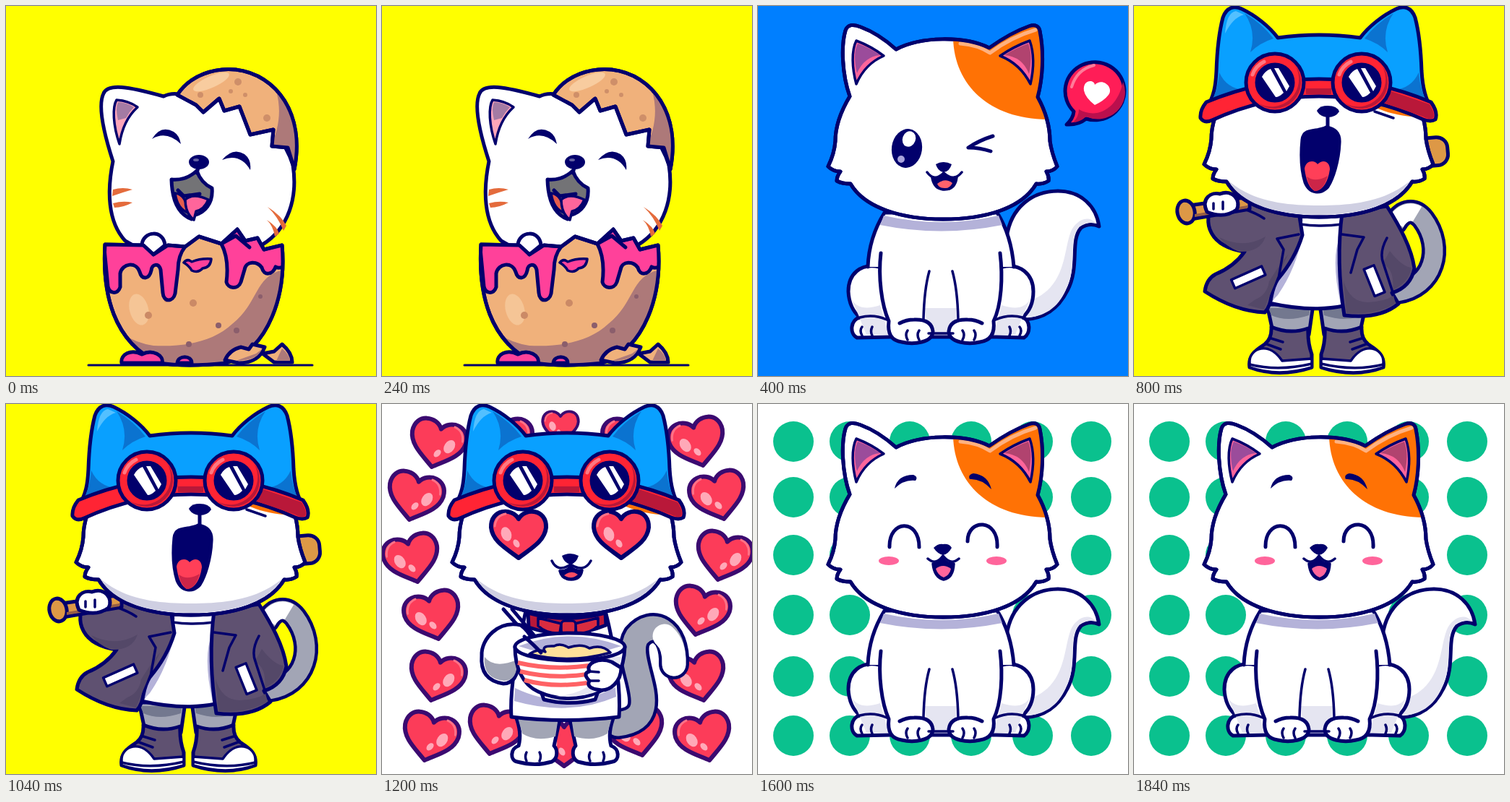
Recreate the animation shown at these times as an HTML page. Size 512x512 px, loop 2000 ms.

```html
<!DOCTYPE html>
<html lang="en">
<head>
<meta charset="utf-8">
<title>Cat stickers</title>
<style>
html, body { margin: 0; width: 100%; height: 100%; overflow: hidden; }
svg { display: block; width: 100vw; height: 100vh; }
.scene { display: none; }
.scene.on { display: inline; }
.ink { stroke: #02006c; stroke-width: 5; stroke-linejoin: round; stroke-linecap: round; }
.flat { stroke: none; }
.thin { stroke-width: 3.5; }
.line { fill: none; }
.white { fill: #fff; }
.navy { fill: #02006c; }
.lilac { fill: #b4b2d9; }
.pale { fill: #e5e5f1; }
.grey { fill: #a2a5b5; }
.pink { fill: #ff659b; }
.orange { fill: #ff7205; }
.shell { fill: #f0b17b; }
.shade { fill: #ad7979; }
.goo { fill: #ff419a; }
.jacket { fill: #5f5171; }
.dark { fill: #544868; }
.wood { fill: #dd9846; }
.red { fill: #ff2434; }
.crimson { fill: #b91839; }
</style>
</head>
<body>
<svg viewBox="0 0 512 512">
<defs>
  <path id="headShape" d="M127 125C116 94 115 54 121 34C124 25 132 25 142 29C161 36 180 50 191 60C225 42 285 41 320 58C337 46 355 35 375 28C384 25 389 28 390 35C396 65 394 100 387 126C398 146 404 166 404 187C406 202 410 212 414 222C410 227 405 229 399 229Q403 236 402 242Q394 247 385 246C365 280 315 295 256 295C200 295 148 280 128 246Q116 246 109 242Q109 236 114 229Q104 229 97 222C102 212 106 200 107 187C107 165 115 145 127 125Z"/>
  <clipPath id="headClip"><use href="#headShape"/></clipPath>
  <path id="egg" d="M137 330L190 331L204 344L224 331L248 333L267 319L298 329L320 309L331 325L348 321L357 337L382 331C388 398 365 473 305 494Q250 500 212 494C148 465 133 397 137 330Z"/>
  <clipPath id="eggClip"><use href="#egg"/></clipPath>
  <path id="shellTop" d="M237 123C255 95 290 85 318 88C375 95 414 150 399 226L390 196L368 194L370 171L338 178L323 139L302 145L295 128L273 147L263 137Z"/>
  <clipPath id="shellClip"><use href="#shellTop"/></clipPath>

  <g id="head">
    <use href="#headShape" class="white"/>
    <g clip-path="url(#headClip)" class="flat">
      <path class="orange" d="M270 45C272 110 320 156 400 157L400 20H270Z"/>
      <path class="line" stroke="#ffb180" stroke-width="5" d="M280 52Q305 54 321 65Q350 43 384 33"/>
    </g>
    <use href="#headShape" class="line"/>
    <g class="thin">
      <path class="pink" d="M136 108C130 86 129 62 136 48Q157 56 174 69Q148 80 136 108Z"/>
      <path class="flat" fill="#9b4c9b" d="M137 93C133 75 133 62 138 52Q155 58 169 68Q147 70 137 93Z"/>
      <path class="pink" d="M377 108C382 86 382 65 376 48Q354 56 335 69Q363 80 377 108Z"/>
      <path class="flat" fill="#b1436f" d="M375 94C379 75 378 62 374 52Q357 58 341 68Q366 70 375 94Z"/>
    </g>
  </g>

  <g id="sitBody">
    <path class="white" d="M344 320C350 278 380 256 415 256C447 256 468 277 472 305Q459 299 447 307C431 325 446 360 428 394C415 420 395 433 368 434Z"/>
    <path class="flat pale" d="M468 301C455 286 438 300 433 312C424 335 426 370 400 394Q385 407 372 407L370 431C395 431 415 418 426 393C443 360 428 325 444 306Q457 297 468 301Z"/>
    <path class="white" d="M168 361C142 355 125 371 125 395Q126 418 141 431C128 434 126 453 137 459L184 458L330 458L368 459C378 453 377 434 366 431Q381 418 381 395C381 371 362 355 338 361"/>
    <path class="white" d="M152 361C153 335 160 310 175 286H331C346 310 352 335 354 361"/>
    <path class="flat white" d="M170 340H336V440H170Z"/>
    <path class="flat pale" d="M129 405Q139 424 169 414L181 455H150L140 430ZM377 405Q367 424 337 414L326 455H356L366 430Z"/>
    <path class="flat pale" d="M230 418H276L272 453H236Z"/>
    <path class="flat lilac" d="M174 290Q253 308 333 290L338 303Q253 320 169 303Z"/>
    <path class="line thin" d="M141 431Q160 426 178 434M366 431Q347 426 329 434M144 444Q140 449 144 456M158 444Q155 450 158 456M362 444Q366 449 362 456M348 444Q351 450 348 456"/>
    <path class="white" d="M170 342C166 375 171 414 181 436C179 453 184 463 199 465C215 469 242 466 242 450Q240 433 216 434Q205 434 196 439"/>
    <path class="white" d="M335 342C339 375 337 414 326 436C328 453 322 463 307 465C291 469 264 466 264 450Q266 433 290 434Q301 434 310 439"/>
    <path class="line thin" d="M237 367Q230 392 229 433M269 367Q276 392 277 433M207 449Q203 455 207 462M223 449Q219 455 223 462M283 449Q287 455 283 462M299 449Q303 455 299 462M236 453H270"/>
  </g>

  <g id="lens">
    <circle class="red" r="40"/>
    <path class="flat crimson" d="M28 -24A37 37 0 0 1 -24 28A38 38 0 0 0 28 -24Z"/>
    <path class="line" style="stroke:#ff7882" d="M-31 -11Q-27 -23 -15 -29"/>
    <circle class="navy" r="25"/>
    <path class="flat white" d="M-18 -8Q-14 -16 -6 -19L12 14Q6 20 1 20ZM-1 -20L5 -20L20 5L16 12Z"/>
  </g>

  <g id="capHead">
    <g transform="translate(0 -3)">
      <use href="#head"/>
      <path class="flat" fill="#cfcfe2" d="M131 245C165 274 210 279 256 279S347 274 382 245C362 278 314 292 256 292S150 278 131 245Z"/>
    </g>
    <path fill="#09a0ff" d="M100 142C111 125 113 110 114 90C115 60 118 35 123 16C128 2 138 -1 149 4C168 13 187 28 199 44Q256 36 313 44C325 28 344 13 363 4C374 -1 384 2 389 16C394 35 397 60 398 90Q400 125 412 142Q256 80 100 142Z"/>
    <g class="flat" fill="#0b73d0">
      <path d="M118 92Q116 118 106 133L152 116Q128 114 118 92ZM394 92Q396 118 406 133L360 116Q384 114 394 92Z"/>
      <path d="M153 10Q178 25 193 45Q174 51 161 64Q170 35 153 10ZM359 10Q334 25 319 45Q338 51 351 64Q342 35 359 10Z"/>
    </g>
    <path class="flat" fill="#53c0ff" d="M126 38Q128 9 141 7L152 12Q137 16 126 38Z"/>
    <path class="red" d="M100 133Q177 101 256 101Q335 101 411 133Q421 147 417 157Q411 161 400 157Q330 125 256 125Q180 125 108 158Q97 163 92 155Q91 144 100 133Z"/>
    <path class="flat crimson" d="M350 116L409 136Q417 149 414 155Q408 158 400 153L342 133ZM238 114H273V122H238Z"/>
    <use href="#lens" x="195" y="106"/>
    <use href="#lens" x="315" y="106"/>
  </g>

  <g id="heart">
    <path fill="#fc3c59" stroke-width="6" d="M0 -20C-9 -36 -39 -34 -38 -8C-36 11 -17 21 0 34C17 21 36 11 38 -8C39 -34 9 -36 0 -20Z"/>
    <path class="line" style="stroke:#ff7287;stroke-width:3" d="M-33 -10Q-31 -25 -18 -27"/>
    <g class="flat" fill="#ffa9b8">
      <ellipse cx="-17" cy="1" rx="7" ry="10" transform="rotate(-20 -17 1)"/>
      <ellipse cx="-3" cy="14" rx="4" ry="6" transform="rotate(-30 -3 14)"/>
    </g>
  </g>

  <g id="shoe">
    <path class="grey" d="M184 413H248L242 455H193Z"/>
    <path class="flat" fill="#73788f" d="M186 418H244L242 428Q212 438 190 428Z"/>
    <path class="jacket" d="M190 444Q215 455 241 446Q240 465 246 482V500Q200 515 160 500C157 482 172 474 181 468Q191 460 190 444Z"/>
    <path class="white thin" d="M160 491C161 474 186 463 205 491L246 488V500Q200 514 160 500Z"/>
    <path class="line thin" d="M160 496Q200 506 246 495"/>
    <path class="line thin" d="M190 460L206 465M184 468L203 475"/>
  </g>

  <g id="leg">
    <path class="white" d="M185 432Q194 455 189 473C177 477 177 493 187 495Q212 502 235 495C244 490 243 478 238 473L247 432Z"/>
    <path class="flat grey" d="M188 434H244L240 460Q213 468 194 456Z"/>
    <path class="line thin" d="M200 482Q197 488 200 494M218 482Q221 488 218 494"/>
  </g>
</defs>

<g class="scene ink">
  <path class="flat" fill="#ff0" d="M0 0H512V512H0Z"/>
  <path class="line" style="stroke-width:3" d="M114 497H424"/>
  <path class="white" d="M148 215C135 175 127 137 135 121C141 107 168 111 218 125Q228 120 240 122C290 100 375 150 397 220C404 265 391 308 355 330L320 345H200L165 325C140 298 140 254 148 215Z"/>
  <path class="thin" fill="#ffa5b9" d="M157 191C148 165 147 140 153 130Q170 131 182 140Q162 158 157 191Z"/>
  <path class="flat" fill="#a47ba4" d="M155 158Q151 142 155 133Q168 134 177 140Q170 147 166 155Z"/>
  <use href="#shellTop" class="shell"/>
  <g clip-path="url(#shellClip)" class="flat">
    <path class="shade" d="M362 90C385 130 380 165 366 195L400 240L420 140Z"/>
    <ellipse cx="284" cy="105" rx="27" ry="8" fill="#f8cc9f" transform="rotate(-24 284 105)"/>
    <g fill="#cf8f69"><circle cx="321" cy="105" r="5"/><circle cx="311" cy="118" r="3"/><circle cx="331" cy="123" r="3"/><circle cx="361" cy="155" r="5"/><circle cx="269" cy="123" r="4"/></g>
  </g>
  <use href="#shellTop" class="line"/>
  <path class="flat navy" d="M202 184Q214 164 232 174Q240 179 242 191Q222 172 202 184ZM299 213Q314 195 330 205Q340 213 338 227Q324 203 299 213Z"/>
  <ellipse class="flat navy" cx="267" cy="216" rx="14" ry="10"/>
  <ellipse class="flat" cx="263" cy="213" rx="4" ry="2" fill="#6260a1"/>
  <path fill="#737376" d="M229 240Q249 242 264 228Q270 245 285 252C287 274 274 286 262 289L257 295Q230 285 229 240Z"/>
  <path class="thin" fill="#e55c4d" d="M234 259Q249 260 252 286Q237 281 234 259Z"/>
  <path class="thin pink" d="M248 268Q259 258 280 268Q274 282 263 284L260 296Q248 287 248 268Z"/>
  <path class="line" d="M266 224L264 231M238 255L246 263L268 260"/>
  <path class="flat" fill="#e46b3c" d="M148 254Q162 250 175 254Q161 258 147 263ZM148 273Q162 269 175 272Q162 279 150 279ZM362 278Q381 290 388 304L384 311Q376 291 362 278ZM361 296Q376 306 378 315L372 319Q370 305 361 296Z"/>
  <path class="white" d="M188 330C190 311 218 309 220 331L204 344Z"/>
  <use href="#egg" class="shell"/>
  <g clip-path="url(#eggClip)">
    <path class="flat shade" d="M390 364C343 370 352 409 313 440C286 465 246 472 204 470Q179 466 164 455L205 510H390Z"/>
    <ellipse class="flat" cx="184" cy="420" rx="13" ry="22" fill="#f5c596" transform="rotate(-15 184 420)"/>
    <g class="flat" fill="#cb8a66"><circle cx="197" cy="428" r="5"/><circle cx="259" cy="411" r="5"/><circle cx="222" cy="407" r="3"/></g>
    <g class="flat" fill="#8b5e6c"><circle cx="319" cy="449" r="4"/><circle cx="294" cy="442" r="4"/><circle cx="352" cy="402" r="3"/><circle cx="253" cy="468" r="4"/></g>
    <path class="goo" d="M135 325H190L204 344L224 331L248 333Q238 345 238 365L234 398C231 410 218 410 217 397L214 365C211 355 202 357 201 366C198 379 188 379 185 368C180 353 161 356 158 370V389C154 400 143 398 141 388Z"/>
    <path class="goo" d="M298 329L320 309L331 325L348 321L357 337L385 329V360Q378 364 373 361C369 372 357 374 354 362C348 353 332 352 330 365L325 382C321 393 307 391 305 382Q309 350 298 329Z"/>
  </g>
  <use href="#egg" class="line"/>
  <path class="goo thin" d="M246 355Q251 349 257 354Q269 349 284 350Q283 362 272 363Q266 370 257 366Q254 360 246 355Z"/>
  <path class="line" d="M298 329L318 318L337 334"/>
  <path class="goo" d="M160 494C158 482 173 474 188 482C203 474 219 484 216 494ZM237 494C238 483 257 483 257 494Z"/>
  <path class="shell" d="M303 490Q309 476 325 472L336 475L341 468L358 472Q350 494 322 494Z"/>
  <path class="flat shade" d="M318 491L346 481L354 475Q347 491 318 491Z"/>
  <path class="shell" d="M355 481L371 478L382 468Q396 480 396 493H371Z"/>
  <path class="flat shade" d="M382 474Q392 482 393 491H374Z"/>
</g>

<g class="scene ink">
  <path class="flat" fill="#007fff" d="M0 0H512V512H0Z"/>
  <use href="#sitBody"/>
  <use href="#head"/>
  <ellipse class="flat navy" cx="206" cy="197" rx="21" ry="27" transform="rotate(8 206 197)"/>
  <ellipse class="flat white" cx="209" cy="184" rx="9" ry="11" transform="rotate(20 209 184)"/>
  <circle class="flat" cx="198" cy="212" r="5" fill="#aaa4dc"/>
  <path class="line" d="M325 180Q306 186 291 196Q307 196 322 201"/>
  <path class="navy flat" d="M246 219Q257 213 268 219Q265 229 257 230Q249 229 246 219Z"/>
  <path class="navy thin" d="M241 238Q251 240 257 233Q265 240 275 237Q273 254 258 254Q244 254 241 238Z"/>
  <path class="flat" fill="#ff626c" d="M248 246Q259 237 269 245Q265 253 258 252Q250 252 248 246Z"/>
  <path class="line thin" d="M234 230Q244 244 257 231Q271 244 282 230"/>
  <path fill="#ff1d57" d="M437 146A41 40 0 1 1 454 156Q443 165 427 164Q436 156 437 146Z"/>
  <path class="flat" fill="#ba0f4d" d="M505 105A38 37 0 0 1 454 153Q445 161 436 161Q444 153 444 143C470 158 498 141 505 105Z"/>
  <path class="line" style="stroke:#ff7c99;stroke-width:4" d="M434 112Q441 88 465 82"/>
  <path class="flat white" d="M466 109C477 98 493 113 485 123Q479 131 466 137Q453 127 451 117C449 102 465 101 466 109Z"/>
</g>

<g class="scene ink">
  <path class="flat" fill="#ff0" d="M0 0H512V512H0Z"/>
  <rect class="wood" x="390" y="182" width="44" height="39" rx="15" transform="rotate(-5 415 200)"/>
  <path class="line" style="stroke-width:34" d="M362 300C372 282 388 280 400 295C430 335 414 389 364 396"/>
  <path class="line" style="stroke:#a2a5b5;stroke-width:25" d="M362 300C372 282 388 280 400 295C430 335 414 389 364 396"/>
  <path class="line" style="stroke:#fff;stroke-width:24;stroke-linecap:butt" d="M362 300C370 286 382 282 392 288"/>
  <use href="#shoe"/>
  <use href="#shoe" transform="translate(505) scale(-1 1)"/>
  <path class="white" d="M230 285C235 325 212 372 187 411Q245 424 290 415V285Z"/>
  <path class="flat lilac" d="M233 317Q225 362 199 400L190 409Q186 398 199 378ZM285 318Q272 350 286 412L291 414V318Z"/>
  <path class="line thin" d="M231 302Q258 306 288 302"/>
  <path class="jacket" d="M112 268C91 303 107 333 153 340Q138 361 113 371Q100 378 98 395C121 410 151 423 181 424C193 410 187 397 199 378Q223 350 233 317L228 285L150 268Z"/>
  <path class="flat dark" d="M118 320Q152 337 182 319Q175 341 145 340Q126 332 118 320ZM168 406Q184 400 187 381Q204 354 214 343Q200 369 194 386Q188 400 180 420L157 414Z"/>
  <path class="jacket" d="M288 286L350 277C367 304 384 334 388 363Q383 389 357 397L366 412Q340 434 291 428Q279 354 288 286Z"/>
  <path class="flat dark" d="M290 380Q298 410 324 410Q346 409 359 401L362 411Q338 428 294 425ZM354 339Q371 361 384 362Q381 382 358 393Q361 364 344 357Z"/>
  <path class="line thin" d="M150 280Q170 287 180 294M198 322L228 316M198 322L207 337L200 377M318 320L288 316M318 320L309 337L300 369M350 321Q339 341 345 356L358 396"/>
  <rect class="white thin" x="-23" y="-6" width="46" height="13" transform="translate(158 375) rotate(-24)"/>
  <rect class="white thin" x="-20" y="-7" width="40" height="15" transform="translate(333 380) rotate(68)"/>
  <path class="wood" d="M77 276L160 264V281L79 295Z"/>
  <ellipse class="wood" cx="72" cy="285" rx="12" ry="16" transform="rotate(-12 72 285)"/>
  <path class="flat" fill="#965e45" d="M84 288L157 276V280L84 292Z"/>
  <path class="white" d="M101 285C92 266 107 257 119 260C136 253 149 269 142 282Q124 295 101 285Z"/>
  <path class="line thin" d="M110 273V281M123 271V281"/>
  <use href="#capHead"/>
  <path class="line thin" d="M333 146L359 155"/>
  <path class="navy flat" d="M253 145Q257 138 268 138Q281 138 284 146Q279 154 268 154Q257 153 253 145Z"/>
  <path class="line" d="M268 150V169"/>
  <path class="navy" d="M233 185C235 168 254 175 266 168C280 170 285 177 284 190C283 215 275 239 268 250C258 261 243 259 237 244C231 225 231 205 233 185Z"/>
  <path class="flat" fill="#ff3f58" d="M236 225C238 213 250 213 254 219C262 211 271 216 271 226C268 248 258 256 250 256Q239 250 236 225Z"/>
  <path class="flat" fill="#cc2548" d="M239 236Q251 245 268 235Q262 256 250 256Q242 250 239 236Z"/>
</g>

<g class="scene ink">
  <path class="flat white" d="M0 0H512V512H0Z"/>
  <g id="hearts" style="stroke:#3b0a70"></g>
  <path class="line" style="stroke-width:42" d="M326 443C400 435 331 356 353 322C374 297 406 312 404 360"/>
  <path class="line" style="stroke:#a2a5b5;stroke-width:33" d="M326 443C400 435 331 356 353 322C374 297 406 312 404 360"/>
  <path class="line" style="stroke:#fff;stroke-width:33" d="M391 321Q405 334 404 360"/>
  <use href="#leg"/>
  <use href="#leg" transform="translate(506) scale(-1 1)"/>
  <path class="white" d="M199 286C190 330 176 388 179 433Q252 442 328 433C331 388 320 330 309 286Z"/>
  <path class="flat lilac" d="M184 393Q255 427 323 392L324 405Q260 433 183 411Z"/>
  <path class="crimson" d="M202 289Q255 304 309 289L310 306Q257 328 203 309Z"/>
  <path class="thin" fill="#d92c40" d="M216 296L248 304L246 317Q228 318 216 307ZM299 296L267 304L269 317Q288 318 299 307Z"/>
  <rect class="thin" fill="#d92c40" x="248" y="300" width="20" height="18" rx="5"/>
  <path class="line" d="M168 284L221 344M180 284L229 342"/>
  <path class="white" d="M192 306C161 299 137 325 138 348Q135 382 168 387Q188 387 190 353L211 348Q213 322 192 306Z"/>
  <path class="flat grey" d="M142 350Q155 367 187 354Q188 383 169 383Q139 380 142 350Z"/>
  <path class="white" d="M220 398L224 409Q260 418 295 409L299 398Z"/>
  <path class="white" d="M184 336C184 364 194 388 216 398Q258 417 301 398C326 388 335 363 336 336Z"/>
  <path class="flat pale" d="M310 350H331Q325 395 280 403L239 405Q303 399 310 350Z"/>
  <path class="line" style="stroke:#ff6265;stroke-width:6;stroke-linecap:butt" d="M188 358Q235 369 286 362M191 370Q235 381 284 374M197 382Q235 393 284 386"/>
  <ellipse class="white" cx="260" cy="336" rx="76" ry="19"/>
  <path class="flat lilac" d="M189 335Q259 308 331 335Q259 360 189 335Z"/>
  <path class="thin" fill="#ffe19a" d="M204 346Q216 338 226 343Q219 334 238 335Q247 330 258 337Q276 331 287 338Q305 332 316 344Q259 360 204 346Z"/>
  <path class="line" d="M197 322Q211 334 220 344"/>
  <path class="white" d="M318 357C300 350 281 359 287 370Q277 373 287 383Q282 392 297 395C317 400 331 382 331 365Z"/>
  <path class="line thin" d="M287 370L300 371M287 383L300 383"/>
  <use href="#capHead"/>
  <use href="#heart" x="189" y="179"/>
  <use href="#heart" x="331" y="179"/>
  <path class="navy flat" d="M249 210Q260 204 272 210Q269 220 261 222Q252 220 249 210Z"/>
  <path class="navy thin" d="M246 231Q255 232 261 225Q268 232 277 230Q275 243 262 243Q249 243 246 231Z"/>
  <path class="flat" fill="#ff4d63" d="M252 237Q262 229 271 236Q262 244 252 237Z"/>
  <path class="line thin" d="M235 217Q243 234 261 222Q280 234 289 217"/>
</g>

<g class="scene ink">
  <path class="flat white" d="M0 0H512V512H0Z"/>
  <g id="coins" class="flat" fill="#0ac18e"></g>
  <use href="#sitBody"/>
  <use href="#head"/>
  <path class="flat navy" d="M189 117Q193 98 215 98Q222 101 218 106Q202 104 189 117ZM323 118Q318 98 298 96Q290 98 293 104Q309 103 323 118Z"/>
  <path class="line" d="M182 198C181 160 223 158 223 198M290 190C290 158 333 158 331 198"/>
  <ellipse class="flat pink" cx="181" cy="217" rx="14" ry="6"/>
  <ellipse class="flat pink" cx="330" cy="217" rx="14" ry="6"/>
  <path class="navy flat" d="M243 199Q249 193 256 194Q265 193 268 199Q263 208 256 209Q248 207 243 199Z"/>
  <path class="navy thin" d="M242 221Q251 222 256 214Q262 222 271 221Q270 241 257 243Q244 240 242 221Z"/>
  <path class="flat pink" d="M246 228Q256 220 267 228Q265 237 257 240Q249 237 246 228Z"/>
  <path class="line thin" d="M235 214Q246 224 256 210Q267 224 278 214"/>
</g>
</svg>
<script>
const byId = id => document.getElementById(id);

const leftLeaning = [[436, 52], [465, 126], [41, 213], [70, 292], [437, 377], [445, 460], [352, 453], [345, 46]];
const rightLeaning = [[77, 54], [46, 127], [473, 210], [442, 286], [76, 377], [67, 460], [157, 451], [168, 46]];
const heart = ([x, y], turn) =>
  `<use href="#heart" transform="translate(${x} ${y}) ${turn}"/>`;
byId('hearts').innerHTML = [
  ...leftLeaning.map(spot => heart(spot, 'rotate(-14)')),
  ...rightLeaning.map(spot => heart(spot, 'rotate(14) scale(-1 1)')),
  heart([247, 30], 'scale(.65)'),
  heart([252, 467], '')
].join('');

const columns = [49, 127, 210, 295, 380, 461];
const rows = [52, 129, 209, 292, 377, 459];
byId('coins').innerHTML = rows.map(y =>
  columns.map(x => `<circle cx="${x}" cy="${y}" r="28"/>`).join('')).join('');

const scenes = document.querySelectorAll('.scene');
const SCENE_MS = 400;
function draw() {
  const current = Math.floor(performance.now() / SCENE_MS) % scenes.length;
  scenes.forEach((scene, i) => scene.classList.toggle('on', i === current));
  requestAnimationFrame(draw);
}
draw();
</script>
</body>
</html>
```
